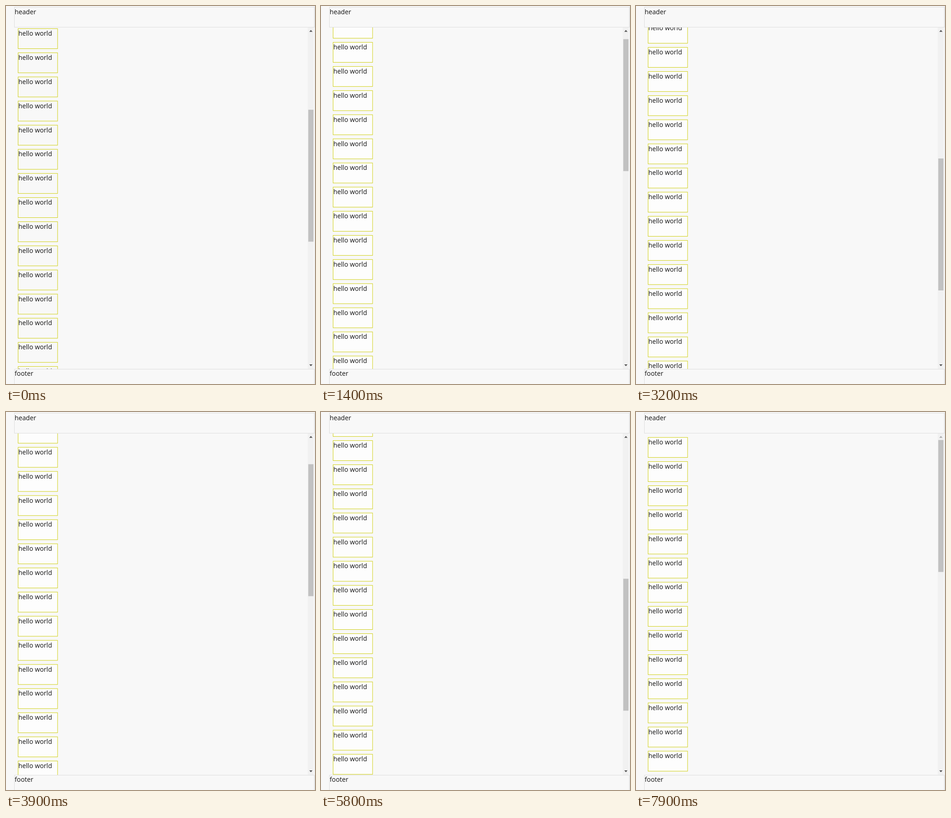
An HTML page that plays this animation: 677x828 px, repeating every 8 s.

```html
<!DOCTYPE html>
<html lang="en">
<head>
<meta charset="utf-8">
<title>Scrolling list</title>
<style>
  html, body { margin: 0; width: 100%; height: 100%; overflow: hidden; background: #f8f8f8; }
  svg { display: block; }
  text { font: 14.2px "Open Sans", "Noto Sans", sans-serif; fill: #111; }
  .panel { fill: none; stroke: #dedede; }
  .item { stroke: #cfcf10; }
  .edge { fill: #e6e6e6; }
  .track { fill: #f1f1f1; }
  #thumb { fill: #c1c1c1; }
  .arrow { fill: #505050; }
  .arrow.off { fill: #a8a8a8; }
</style>
</head>
<body>
<svg width="677" height="828">
  <rect class="panel" x="18.5" y="2.5" width="657" height="44"/>
  <text x="19" y="18">header</text>
  <rect class="panel" x="18.5" y="795.5" width="657" height="44"/>
  <text x="19" y="810">footer</text>
  <rect class="edge" x="676" width="1" height="828"/>

  <svg y="47" width="661" height="748"><g id="list"></g></svg>

  <g transform="translate(661 47)">
    <rect class="track" width="13" height="748"/>
    <rect id="thumb" x="1.3" width="11.4" height="289"/>
    <path id="up" class="arrow" d="M7 5.5l3.5 4h-7z"/>
    <path id="down" class="arrow" d="M7 742l3.5-4h-7z"/>
  </g>
</svg>
<script>
  const LOOP = 8000, STEP = 100, ROWS = 35, PITCH = 52.86;
  const TOP = 0, BOTTOM = 1111, FIRST = 429, TRAVEL = 429.5;
  // Scrollbar drags: [start ms, end ms, offset reached]; the list rests in between
  const drags = [
    [400, 1000, TOP],
    [1300, 1400, 29], [1400, 2300, BOTTOM],
    [2700, 3900, 137], [3900, 4100, TOP],
    [4500, 4900, 292], [4900, 5800, 786], [5800, 6300, BOTTOM],
    [7000, 7400, 450], [7600, 7900, TOP]
  ];
  const $ = id => document.getElementById(id);
  const list = $('list'), thumb = $('thumb'), up = $('up'), down = $('down');

  list.innerHTML = Array.from({ length: ROWS }, (_, i) => `
    <g transform="translate(26.5 ${8.7 + i * PITCH})">
      <rect class="item" width="86.5" height="43.9"/>
      <text x=".6" y="15.6">hello world</text>
    </g>`).join('');

  const progress = (t, a, b) => Math.min(1, Math.max(0, (t - a) / (b - a)));
  const scrollAt = t => drags.reduce(
    (y, [a, b, to]) => y + (to - y) * progress(t, a, b), FIRST);

  function draw(now) {
    const t = Math.floor(now % LOOP / STEP) * STEP;
    const y = scrollAt(t);
    list.setAttribute('transform', `translate(0 ${-y})`);
    list.setAttribute('fill', t < 500 ? '#f8f8f8' : '#fdfdfd');
    thumb.setAttribute('y', 14.4 + y / BOTTOM * TRAVEL);
    up.classList.toggle('off', y <= TOP);
    down.classList.toggle('off', y >= BOTTOM);
  }

  const start = performance.now();
  function frame() {
    draw(performance.now() - start);
    requestAnimationFrame(frame);
  }
  frame();
</script>
</body>
</html>
```
